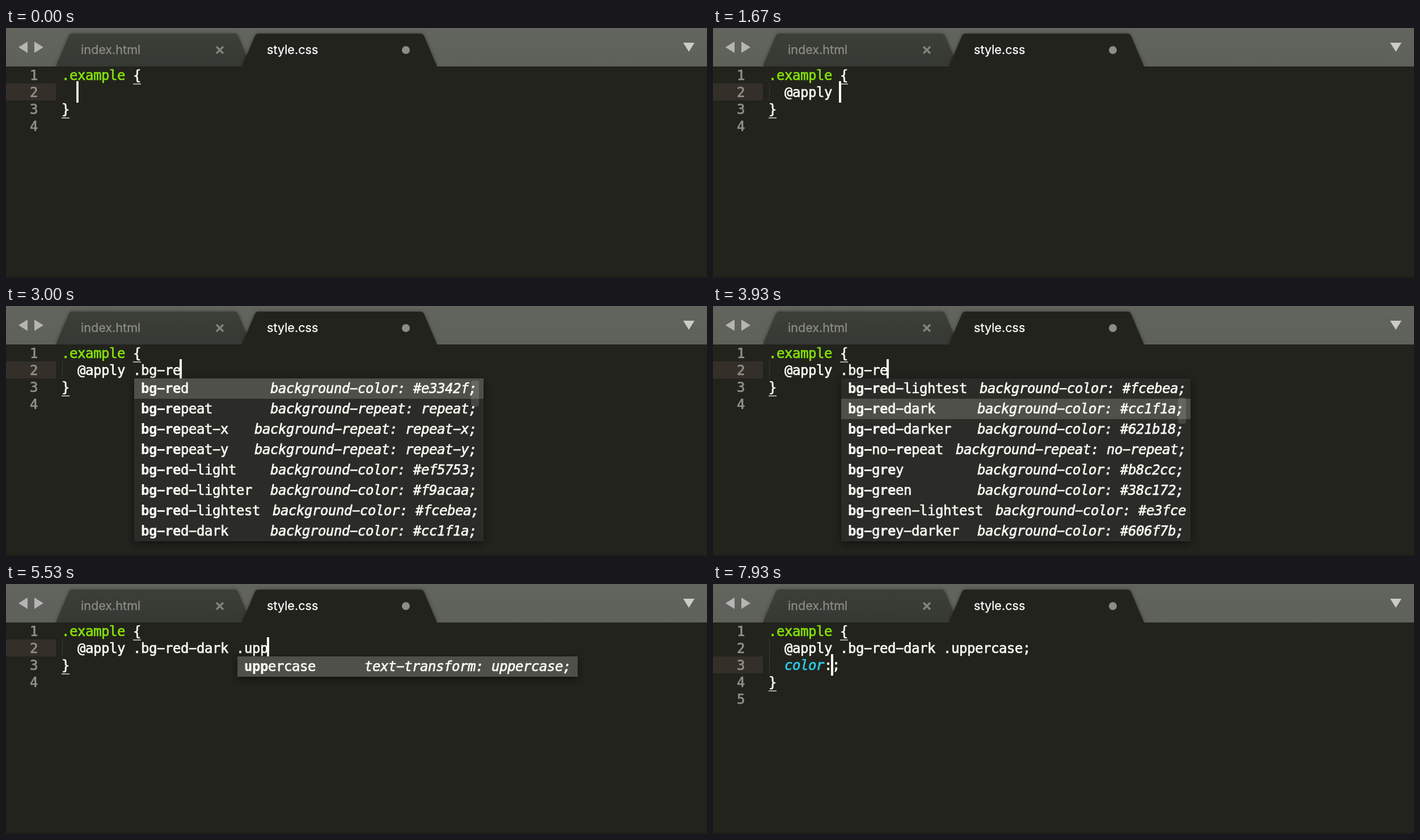
An HTML page with a canvas that plays this animation: 1236x442 px, repeating every 8 s.

```html
<!DOCTYPE html>
<html lang="en">
<head>
<meta charset="utf-8">
<title>Editor completion</title>
<style>
html, body { margin: 0; width: 1236px; height: 442px; overflow: hidden; background: #22231d; }
canvas { display: block; }
</style>
</head>
<body>
<canvas id="stage" width="1236" height="442"></canvas>
<script>
const ctx = document.getElementById('stage').getContext('2d');
const W = 1236, H = 442, LOOP = 8000, TICK = 1000 / 15;
const CELL = 14, LINE = 30, ROW = 36, LEFT = 98, TOP = 68;
const BG = '#22231d', INK = '#fafaf4', GREEN = '#86e208', CYAN = '#2dcdea', DIM = '#8f908a';
const MONO = '24px "DejaVu Sans Mono", Menlo, monospace';
const UI = '21.6px Inter, Roboto, sans-serif';

// Each row: class name, then its hint; a bare colour stands for background-color.
const rows = text => text.trim().split('\n').map(line => {
  const [name, ...rest] = line.trim().split(' ');
  const hint = rest.join(' ');
  return { name, hint: hint[0] === '#' ? `background-color: ${hint};` : hint };
});

const LISTS = {
  apply: { width: 600, rows: rows('apply') },
  bg: { width: 600, rows: rows(`
    bg-red #e3342f
    bg-teal #4dc0b5
    bg-white #ffffff
    bg-pink #f66d9b
    bg-repeat background-repeat: repeat;
    bg-purple #9561e2
    bg-grey #b8c2cc
    bg-bottom background-position: bottom;
    bg-fixed background-attachment: fixed;
    bg-green #38c172
    bg-black #22292f
    bg-blue #3490dc`) },
  red: { width: 616, rows: rows(`
    bg-red #e3342f
    bg-repeat background-repeat: repeat;
    bg-repeat-x background-repeat: repeat-x;
    bg-repeat-y background-repeat: repeat-y;
    bg-red-light #ef5753
    bg-red-lighter #f9acaa
    bg-red-lightest #fcebea
    bg-red-dark #cc1f1a
    bg-red-darker #621b18
    bg-no-repeat background-repeat: no-repeat;
    bg-grey #b8c2cc
    bg-green #38c172
    bg-green-lightest #e3fcec
    bg-grey-darker #606f7b`) },
  u: { width: 600, rows: rows(`
    uppercase text-transform: uppercase;
    underline text-decoration: underline;
    rounded border-radius: .25rem;
    no-underline text-decoration: none;
    outline-none outline: 0;
    justify-end justify-content: flex-end;
    bg-blue #3490dc
    bg-purple #9561e2`) },
  upp: { width: 600, rows: rows('uppercase text-transform: uppercase;') },
  css: { width: 600, rows: rows(`
    color property
    clear property
    content property
    cursor property
    columns property
    column-gap property
    column-rule property
    column-width property`) }
};

// Tick, text of the edited line, open list.
const BASE = '@apply .bg-red-dark ';
const STEPS = [
  [0, ''], [13, '@'], [15, '@a', 'apply'], [17, '@ap', 'apply'], [18, '@app', 'apply'],
  [20, '@appl', 'apply'], [22, '@apply', 'apply'], [25, '@apply '], [27, '@apply .'],
  [29, '@apply .b', 'bg'], [31, '@apply .bg', 'bg'], [33, '@apply .bg-', 'bg'],
  [43, '@apply .bg-r', 'red'], [45, '@apply .bg-re', 'red'], [61, BASE.trim()],
  [73, BASE], [76, BASE + '.'], [78, BASE + '.u', 'u'], [80, BASE + '.up', 'upp'],
  [82, BASE + '.upp', 'upp'], [88, BASE + '.uppercase'], [93, BASE + '.uppercase;'],
  [101, ''], [108, 'c'], [109, 'c', 'css'], [111, 'co', 'css'], [113, 'col', 'css'],
  [117, 'color:;']
];
const NEW_LINE = 101;

const clamp = (v, lo, hi) => Math.max(lo, Math.min(hi, v));
const ease = v => (1 - Math.cos(Math.PI * clamp(v, 0, 1))) / 2;

function caretAlpha(n) {
  if (n < 12) return 1 - ease((n + 1) / 5);
  if (n < 17) return ease((n - 11) / 5);
  if (n >= 66 && n < 73) return 1 - ease((n - 66) / 5);
  return 1;
}

// Selected row and first visible row while the arrow keys are held.
function selection(n, list) {
  if (list === 'bg') {
    const at = clamp(2 * (n - 33) - 1, 0, 11);
    return [at, Math.max(0, at - 7)];
  }
  if (list === 'red') {
    const down = clamp(2 * (n - 46), 0, 13);
    return [n > 56 ? 13 - 2 * (n - 56) : down, Math.max(0, down - 7)];
  }
  return [0, 0];
}

function box(x, y, w, h, color) {
  ctx.fillStyle = color;
  ctx.fillRect(x, y, w, h);
}

function poly(color, ...pts) {
  ctx.fillStyle = color;
  ctx.beginPath();
  for (let i = 0; i < pts.length; i += 2) ctx.lineTo(pts[i], pts[i + 1]);
  ctx.fill();
}

// Filled text thickened by a hairline outline, like smoothed screen fonts.
function ink(text, x, y, color, weight) {
  ctx.fillStyle = ctx.strokeStyle = color;
  ctx.lineWidth = weight;
  ctx.lineJoin = 'round';
  ctx.fillText(text, x, y);
  ctx.strokeText(text, x, y);
}

// Monospaced text on a whole-pixel grid, with the wide hyphen of the editor font.
function mono(text, x, y, color, style = '') {
  ctx.font = `${style} ${MONO}`;
  const weight = style === 'bold' ? 0.2 : 0.7;
  [...text].forEach((c, i) => ink(c === '-' ? '\u2212' : c, x + i * CELL, y, color, weight));
}

function fade(y0, y1, a, b) {
  const g = ctx.createLinearGradient(0, y0, 0, y1);
  g.addColorStop(0, a);
  g.addColorStop(1, b);
  return g;
}

function tab(x, fill) {
  const r = x + 344;
  ctx.save();
  ctx.beginPath();
  ctx.rect(0, 0, W, TOP);
  ctx.clip();
  ctx.shadowColor = 'rgba(0,0,0,.4)';
  ctx.shadowBlur = 6;
  ctx.fillStyle = fill;
  ctx.beginPath();
  ctx.moveTo(x, TOP);
  ctx.lineTo(x + 22.5, 15);
  ctx.quadraticCurveTo(x + 24.5, 10, x + 29, 10);
  ctx.lineTo(r - 29, 10);
  ctx.quadraticCurveTo(r - 24.5, 10, r - 22.5, 15);
  ctx.lineTo(r, TOP);
  ctx.fill();
  ctx.restore();
}

function label(text, x, color) {
  ctx.font = UI;
  ink(text, x, 46, color, 0.3);
}

function drawTabs() {
  box(0, 0, W, TOP, fade(0, TOP, '#62645e', '#5e605a'));
  tab(88, fade(10, TOP, '#3c3e38', '#363833'));
  tab(416, BG);
  poly('#b5b6b3', 22, 34, 38, 24, 38, 44);
  poly('#b5b6b3', 50, 24, 66, 34, 50, 44);
  poly('#cbccc9', 1194, 26, 1214, 26, 1204, 42);
  label('index.html', 132, '#8b8c87');
  label('style.css', 460, '#ffffff');
  ctx.strokeStyle = '#82837e';
  ctx.lineWidth = 3.4;
  ctx.beginPath();
  ctx.moveTo(371, 33);
  ctx.lineTo(383, 45);
  ctx.moveTo(383, 33);
  ctx.lineTo(371, 45);
  ctx.stroke();
  ctx.fillStyle = '#8c8d89';
  ctx.beginPath();
  ctx.arc(705, 39, 7, 0, 7);
  ctx.fill();
}

function drawRow(row, prefix, x, y, right) {
  let hit = 0;
  [...row.name].forEach((c, i) => {
    const match = c === prefix[hit];
    if (match) hit++;
    mono(c, x + i * CELL, y, INK, match ? 'bold' : '');
  });
  const start = Math.max(right - 12 - row.hint.length * CELL, x + row.name.length * CELL + 22);
  mono(row.hint, start, y, INK, 'italic');
}

function drawPopup(n, name, prefix, wordX, y) {
  const { width, rows } = LISTS[name];
  const [at, first] = selection(n, name);
  const x = wordX - 12, right = x + width;
  const shown = rows.slice(first, first + 8), h = shown.length * ROW;
  ctx.save();
  ctx.shadowColor = 'rgba(0,0,0,.5)';
  ctx.shadowBlur = 14;
  ctx.shadowOffsetY = 4;
  box(x, y, width, h, '#2b2c27');
  ctx.restore();
  box(x, y + (at - first) * ROW, width, ROW, '#4f504a');
  ctx.save();
  ctx.beginPath();
  ctx.rect(x, y, width - 8, h);
  ctx.clip();
  shown.forEach((row, i) => drawRow(row, prefix, wordX, y + i * ROW + 26, right));
  if (rows.length > 8) {
    ctx.fillStyle = 'rgba(255,255,255,.13)';
    ctx.beginPath();
    ctx.roundRect(right - 22, y + 4 + 5 * first, 14, 46, 4);
    ctx.fill();
  }
  ctx.restore();
}

function draw(n) {
  const [, text, list] = STEPS.filter(s => s[0] <= n).pop();
  const lines = n < NEW_LINE ? [text] : [BASE + '.uppercase;', text];
  const current = lines.length, close = current + 1;
  const lineTop = i => TOP + i * LINE;
  const base = i => lineTop(i) + 24;
  const indent = LEFT + 2 * CELL;

  box(0, 0, W, H, BG);
  box(0, H - 2, W, 2, '#1c1d18');
  drawTabs();

  box(0, lineTop(current), 88, LINE, '#342f29');
  for (let i = 0; i < close + 2; i++) mono(String(i + 1), 42, base(i), DIM);

  mono('.example', LEFT, base(0), GREEN);
  mono('{', LEFT + 9 * CELL, base(0), INK);
  mono('}', LEFT, base(close), INK);
  box(LEFT + 9 * CELL, lineTop(1), CELL, 2, '#a9aaa4');
  box(LEFT, lineTop(close + 1), CELL, 2, '#a9aaa4');

  lines.forEach((line, i) => {
    if (!line) return;
    for (let y = 0; y < LINE; y += 4) box(99, lineTop(i + 1) + y, 1, 2, '#4d4e48');
    const done = line.startsWith('color');
    if (done) mono('color', indent, base(i + 1), CYAN, 'italic');
    mono(done ? '     ' + line.slice(5) : line, indent, base(i + 1), INK);
  });

  const column = text === 'color:;' ? 6 : text.length;
  ctx.globalAlpha = caretAlpha(n);
  box(indent + column * CELL - 2, lineTop(current) - 4, 4, 38, INK);
  ctx.globalAlpha = 1;

  if (list) {
    const prefix = text.match(/[\w-]*$/)[0];
    drawPopup(n, list, prefix, indent + (text.length - prefix.length) * CELL, lineTop(close));
  }
}

function frame() {
  const t = performance.now() % LOOP;
  draw(Math.min(119, Math.floor(t / TICK + 0.1)));
  requestAnimationFrame(frame);
}
frame();
</script>
</body>
</html>
```
